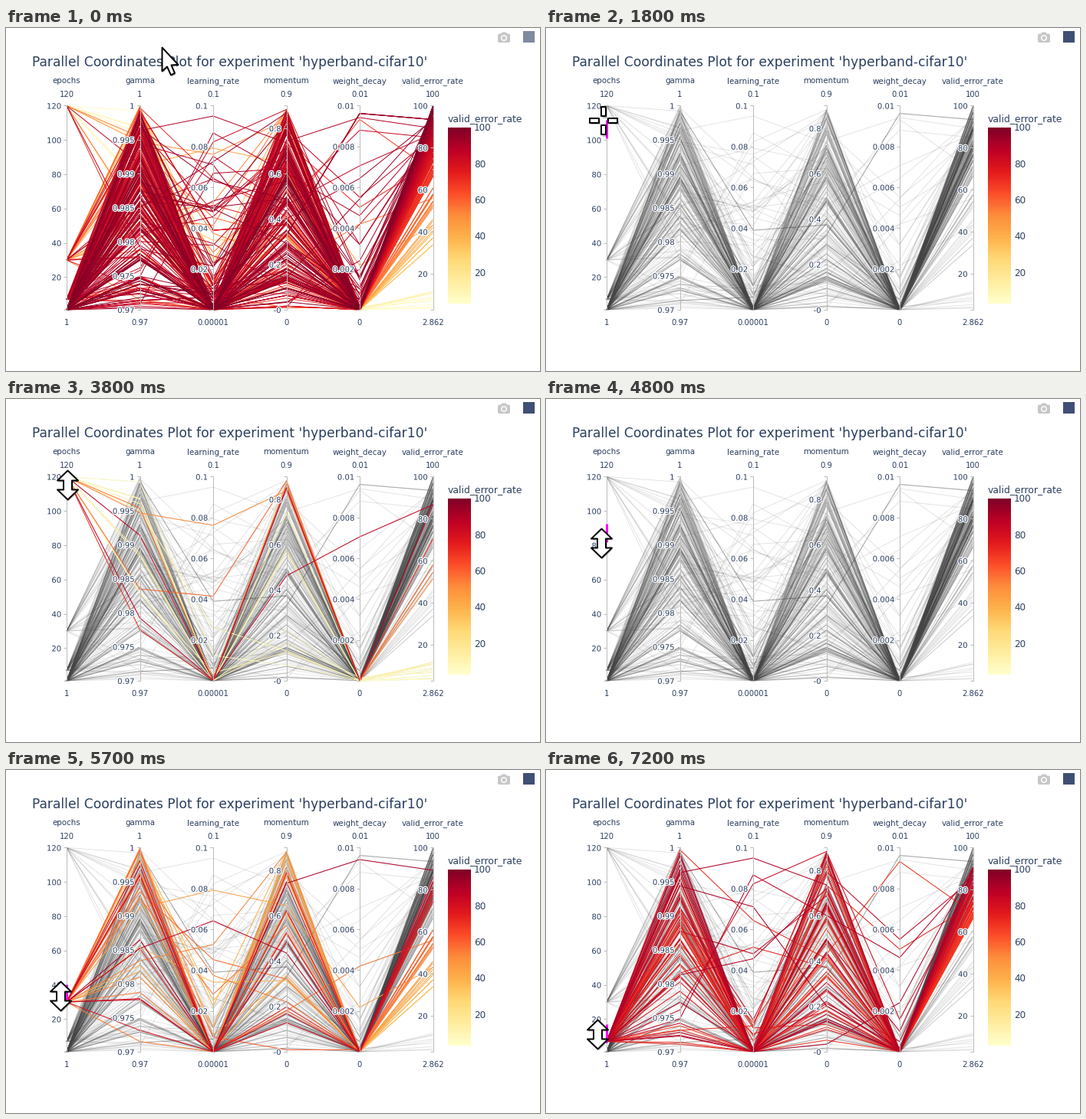
Write a matplotlib script that moves like this. It is 696x448 px and loops after 8000 ms.

```python
import numpy as np
import matplotlib.pyplot as plt
from matplotlib.animation import FuncAnimation
from matplotlib.collections import LineCollection, PolyCollection
from matplotlib.patches import Circle, FancyBboxPatch, Polygon, Rectangle
from matplotlib.patheffects import withStroke

W, H, DPI = 696, 448, 100
PX = 72 / DPI                      # one pixel in points
TOP, BOTTOM = 101.5, 368
XS = 79 + 95.5 * np.arange(6)
INK = "#2a3f5f"
CMAP = plt.get_cmap("YlOrRd")

# name, low, high, top text, bottom text, tick step
DIMS = [
    ("epochs", 1, 120, "120", "1", 20),
    ("gamma", 0.97, 1, "1", "0.97", 0.005),
    ("learning_rate", 0.00001, 0.1, "0.1", "0.00001", 0.02),
    ("momentum", 0, 0.9, "0.9", "0", 0.2),
    ("weight_decay", 0, 0.01, "0.01", "0", 0.002),
    ("valid_error_rate", 2.862, 100, "100", "2.862", 20),
]


def height(value, low, high):
    return BOTTOM - (value - low) / (high - low) * (BOTTOM - TOP)


# epochs, runs, copies of each, skew towards the top, best and worst error
GROUPS = [
    (120, 9, 1, 1.4, 12, 3.5),
    (120, 4, 1, 1.6, 71, 43),
    (30, 22, 1, 2, 62, 31),
    (30, 8, 1, 1, 90, 72),
    (7, 62, 1, 1.2, 91, 66),
    (1, 85, 1, 1, 100, 80),
    (1, 24, 4, 1, 100, 72),
]
# Runs that stand apart: epochs, then heights on the other axes
LONERS = [
    (120, 286, 367, 231, 180, 138),
    (120, 178, 367, 116, 367, 138),
    (30, 222, 367, 148, 117, 131),
    (30, 233, 197, 239, 367, 140),
    (30, 180, 157, 177, 310, 258),
    (7, 134, 115, 150, 367, 128),
    (7, 325, 137, 190, 245, 135),
]


def make_runs():
    rng = np.random.default_rng(11)

    def spread(lo, hi, power=1.0):
        return lo + (hi - lo) * rng.random() ** power

    def log_height(decades):
        return BOTTOM - (BOTTOM - TOP) * 10 ** -spread(0, decades)

    rows = list(LONERS)
    for epochs, count, copies, skew, worst, best in GROUPS:
        rate = 4 if epochs == 1 and copies == 1 else 7
        for _ in range(count):
            error = height(spread(worst, best), *DIMS[5][1:3])
            run = (epochs, spread(102, 366, skew), log_height(rate),
                   spread(106, 366, skew), log_height(2 * rate), error)
            rows += [run] * copies
    rows = np.array(rows, float)
    rows[:, 0] = height(rows[:, 0], *DIMS[0][1:3])
    return rows[np.argsort(-rows[:, 5])]


RUNS = make_runs()
LINES = np.stack([np.broadcast_to(XS, RUNS.shape), RUNS], axis=2)
COLORS = CMAP((BOTTOM - RUNS[:, 5]) / (BOTTOM - TOP))

fig = plt.figure(figsize=(W / DPI, H / DPI), dpi=DPI, facecolor="white")
ax = fig.add_axes([0, 0, 1, 1])
ax.axis("off")
HALO = [withStroke(linewidth=2.4 * PX, foreground="white")]


def label(x, y, text, size, ha="center", halo=False):
    ax.text(x, y, text, fontsize=size * PX, color=INK, ha=ha, va="baseline",
            family="DejaVu Sans", zorder=6, path_effects=HALO if halo else None)


def draw_axes():
    for x, (name, low, high, top, bottom, step) in zip(XS, DIMS):
        label(x, 72, name, 10.2)
        label(x, 90, top, 10)
        label(x, 388, bottom, 10)
        first, last = np.ceil(low / step - 1e-6), np.floor(high / step + 1e-6)
        ticks = np.arange(first, last + 1) * step
        marks = [height(t, low, high) for t in ticks]
        for y, t in zip(marks, ticks):
            # the decay axis starts just above zero
            if name != "weight_decay" or t > 0:
                label(x - 7, y + 4, f"{t:.4g}", 10, "right", True)
        segs = [[(x, TOP), (x, BOTTOM)]]
        segs += [[(x - 4, y), (x, y)] for y in marks + [TOP, BOTTOM]]
        ax.add_collection(LineCollection(segs, colors="#bcbcbc",
                                         linewidths=PX, zorder=4))


def draw_colorbar():
    ax.imshow(np.linspace(1, 0, 256)[:, None], cmap=CMAP, aspect="auto",
              extent=(576, 606, 360, 130), zorder=3)
    label(576, 122, "valid_error_rate", 12.35, "left")
    for v in range(20, 101, 20):
        y = 360 - 230 * (v - 2.862) / 97.138
        label(610, y + 4.4, str(v), 12, "left")


def draw_camera():
    grey = "#c7c7c7"
    ax.add_patch(FancyBboxPatch((642.5, 9), 13, 8.5, fc=grey, ec=grey, lw=0,
                                boxstyle="round,pad=1.5,rounding_size=2"))
    ax.add_patch(Polygon([(645, 8), (646.5, 5.5), (651.5, 5.5), (653, 8)],
                         color=grey, lw=0))
    ax.add_patch(Circle((649, 13), 4, color="white", lw=0, zorder=3))
    ax.add_patch(Circle((649, 13), 2.5, color=grey, lw=0, zorder=4))


draw_axes()
draw_colorbar()
draw_camera()
label(34, 50, "Parallel Coordinates Plot for experiment 'hyperband-cifar10'",
      17.08, "left")
ax.set_xlim(0, W)
ax.set_ylim(H, 0)

badge = ax.add_patch(Rectangle((673.5, 4.5), 15, 15, lw=0))
context = ax.add_collection(LineCollection(
    LINES, colors="#444444", alpha=0.14, linewidths=PX, zorder=1))
active = ax.add_collection(LineCollection([], linewidths=PX, zorder=2))
brush, = ax.plot([], [], color="#ff00ff", lw=3 * PX, zorder=5,
                 solid_capstyle="butt")
shadow = ax.add_collection(PolyCollection(
    [], facecolors="black", alpha=0.25, linewidths=0, zorder=8))
cursor = ax.add_collection(PolyCollection(
    [], facecolors="white", edgecolors="black", linewidths=2 * PX,
    joinstyle="round", zorder=9))


def cross_shape():
    arm = np.array([(-2.8, 6), (2.8, 6), (2.8, 18), (-2.8, 18)])
    return [arm, -arm, arm[:, ::-1], -arm[:, ::-1]]


def resize_shape():
    half = np.array([(0, -19), (13.5, -6), (5.5, -6)])
    right = np.vstack([half, half[::-1] * (1, -1)])
    return [np.vstack([right, right[::-1] * (-1, 1)])]


SHAPES = {
    "arrow": [np.array([(1, 1), (1, 32), (7.5, 26), (12.5, 37), (17.5, 34.5),
                        (13, 24), (22, 23.5)])],
    "cross": cross_shape(),
    "resize": resize_shape(),
}

# Start and end step, cursor kind, then its x, y and the top of the brush
START = (202, 24, 122)
MOVES = [
    (0, 6, "arrow", (92, 114, 122)),
    (6, 9, "cross", (75, 123, 122)),
    (17, 23, "cross", (77, 98, 101)),
    (30, 33, "arrow", (110, 114, 101)),
    (33, 35, "arrow", (92, 98, 101)),
    (37, 38, "resize", (80, 112, 101)),
    (44, 48, "resize", (72, 188, 163)),
    (49, 57, "resize", (71, 295, 280)),
    (65, 72, "resize", (67, 345, 332)),
]
DRAG_START, BRUSH_SIZE = 17, 24


def pose(i):
    kind, place = "arrow", np.array(START, float)
    for begin, end, shape, goal in MOVES:
        if i <= begin:
            break
        u = min((i - begin) / (end - begin), 1)
        kind = shape
        place = place + (np.array(goal) - place) * u * u * (3 - 2 * u)
    return kind, place


def update(i):
    kind, (x, y, top) = pose(i)
    shape = [p + (x, y) for p in SHAPES[kind]]
    cursor.set_verts(shape)
    shadow.set_verts([p + (1.5, 2.5) for p in shape])

    brushed = i > DRAG_START
    span = np.array([top, top + BRUSH_SIZE])
    keep = np.ones(len(RUNS), bool)
    if brushed:
        keep = (RUNS[:, 0] >= span[0]) & (RUNS[:, 0] <= span[1])
    brush.set_data([XS[0], XS[0]], span)
    brush.set_visible(brushed)
    context.set_visible(brushed)
    active.set_segments(LINES[keep])
    active.set_color(COLORS[keep])

    light, dark = np.array([125, 138, 160]), np.array([63, 79, 117])
    badge.set_facecolor((light + (dark - light) * min(i / 4, 1)) / 255)
    return cursor, shadow, brush, context, active, badge


anim = FuncAnimation(fig, update, frames=80, interval=100, repeat=True,
                     repeat_delay=0, cache_frame_data=False)
plt.show()
```
